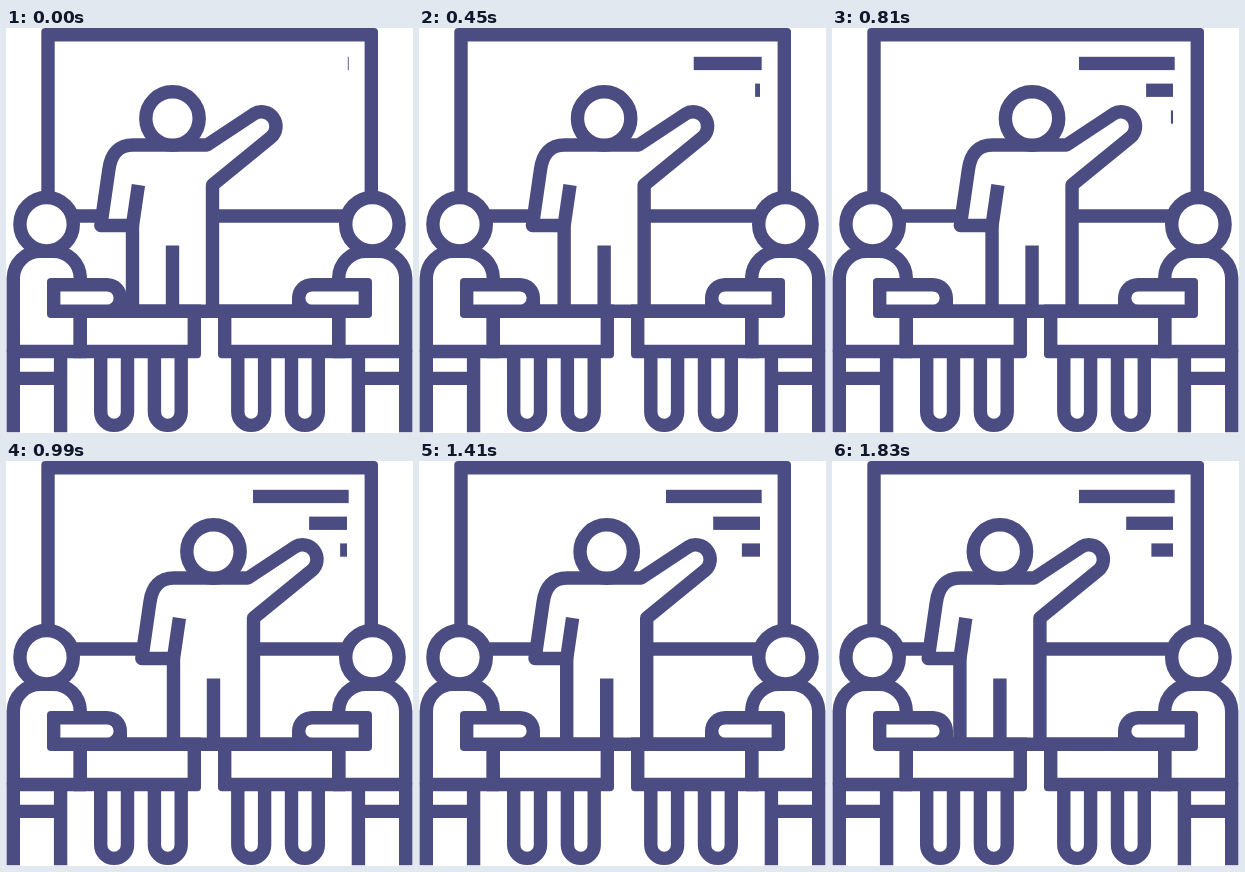
An HTML page with a canvas for the animation above (1.86 s loop, 407 px wide and 405 px high).

```html
<!DOCTYPE html>
<html lang="en">
<head>
<meta charset="utf-8">
<title>Presentation</title>
<style>
html, body { margin: 0; width: 100%; height: 100%; overflow: hidden; background: #fff; }
canvas { display: block; }
</style>
</head>
<body>
<canvas id="stage" width="407" height="405"></canvas>
<script>
const ctx = document.getElementById('stage').getContext('2d');
const INK = '#4b4d82', W = 13.4;
const LOOP = 1860, STEP = 30, TURN = 990, REACH = 41;

const clamp = v => Math.max(0, Math.min(1, v));

function line(d, filled) {
  const p = new Path2D(d);
  if (filled) ctx.fill(p);
  ctx.stroke(p);
}

function ring(x, y) {
  ctx.beginPath();
  ctx.arc(x, y, 26.7, 0, Math.PI * 2);
  ctx.fill();
  ctx.stroke();
}

// Frame with softly rounded outer corners and a white inside
function box(x, y, w, h, r, inner = 0) {
  ctx.fillStyle = INK;
  ctx.beginPath();
  ctx.roundRect(x, y, w, h, r);
  ctx.fill();
  ctx.fillStyle = '#fff';
  ctx.beginPath();
  ctx.roundRect(x + W, y + W, w - 2 * W, h - 2 * W, inner);
  ctx.fill();
}

// Board text line growing to the left
function bar(t, right, y, width, start, end) {
  const w = width * clamp((t - start) / (end - start));
  ctx.fillStyle = INK;
  ctx.fillRect(right - w, y, w, 13.3);
  ctx.fillStyle = '#fff';
}

function speaker(dx) {
  ctx.save();
  ctx.translate(dx, 0);
  line('M126.5 283V197.5H94.8L102.8 142Q106 117 127 117H201L247.9 86' +
       'A14.5 14.5 0 0 1 265 109.3L206.5 157V283', true);
  line('M132.4 157L126.5 197.5M166.5 217.5V283');
  ring(166.5, 90.5);
  ctx.restore();
}

function listener() {
  line('M7.3 323.5V250A27 27 0 0 1 34.3 223.4H47A27 27 0 0 1 74.3 250V323.5', true);
  ring(40.6, 196.2);
  box(67.6, 276.6, 127.4, 53.6, [0, 0, 4, 0]);
  box(41, 250, 80, 40, [4, 20, 0, 4], [0, 6.6, 6.6, 0]);
  line('M7.3 404.3V323.5H80M54.6 323.5V404.3M7.3 350.4H54.6');
  for (const x of [94.7, 148.4]) {
    line(`M${x} 323.5V384a13.4 13.4 0 0 0 26.8 0V323.5`);
  }
}

function draw(t) {
  const dx = t < TURN ? REACH * t / TURN : REACH * (LOOP - t) / (LOOP - TURN);
  ctx.fillStyle = '#fff';
  ctx.fillRect(0, 0, 407, 405);
  ctx.strokeStyle = INK;
  ctx.lineWidth = W;
  ctx.lineJoin = 'round';

  box(35.3, 0, 336.7, 194.7, 4);
  bar(t, 342.7, 28.8, 95.7, -6, 636);
  bar(t, 341, 55.6, 46.8, 370, 1136);
  bar(t, 341, 82.4, 21.6, 732, 1540);
  speaker(dx);

  listener();
  ctx.save();
  ctx.translate(407, 0);
  ctx.scale(-1, 1);
  listener();
  ctx.restore();
  line('M108 283.3H299');
}

const begin = performance.now();
function tick() {
  const t = (performance.now() - begin) % LOOP;
  draw(Math.floor(t / STEP) * STEP);
  requestAnimationFrame(tick);
}
tick();
</script>
</body>
</html>
```
